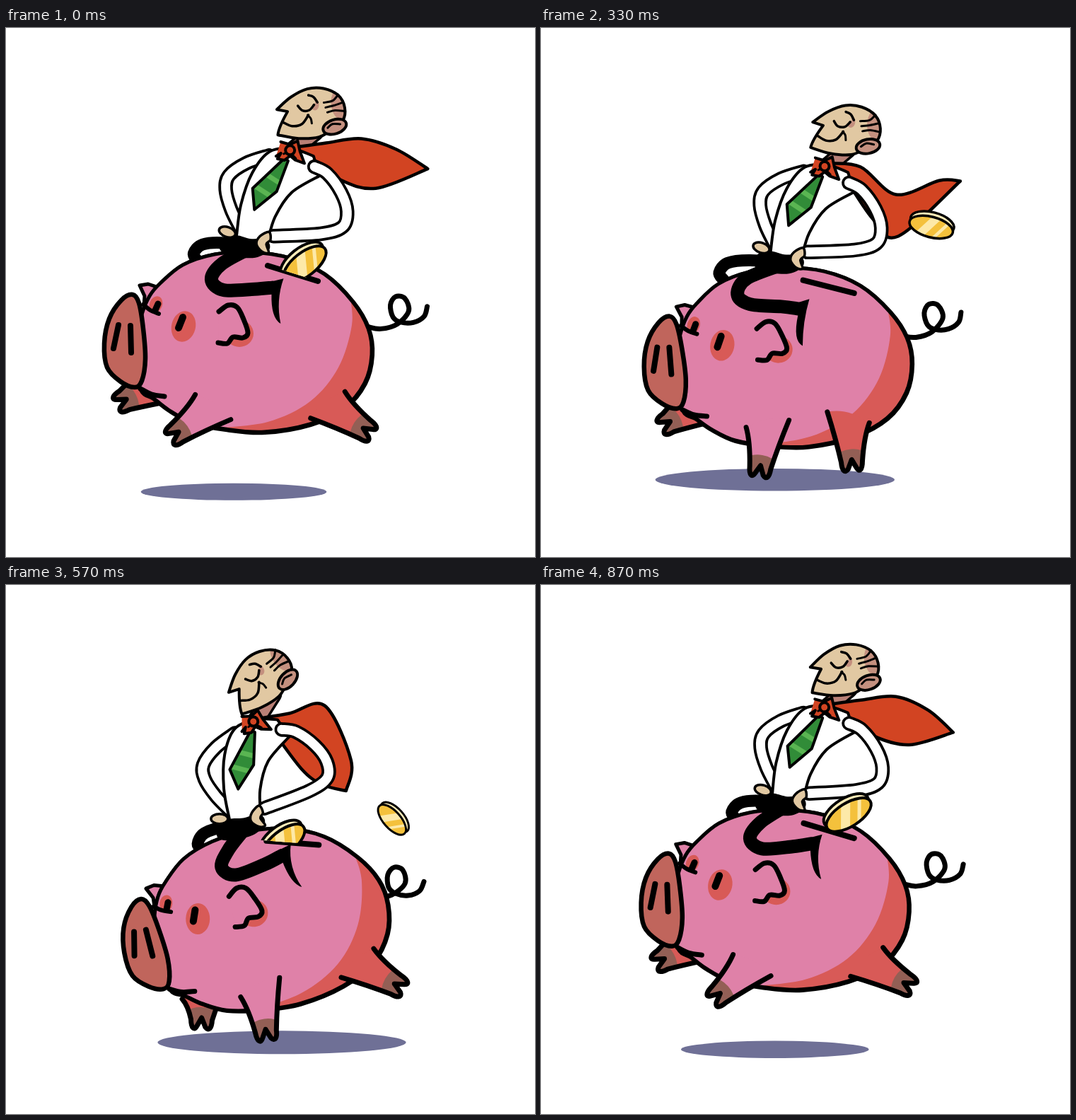
Animation, 748 px wide and 748 px high, one loop 0.9 s. Source, as an HTML page with a canvas:

```html
<!DOCTYPE html>
<html>
<head>
<meta charset="utf-8">
<style>
html, body { margin: 0; width: 100%; height: 100%; overflow: hidden; background: #fff; }
canvas { display: block; width: 100vw; height: 100vh; }
</style>
</head>
<body>
<canvas id="stage" width="748" height="748"></canvas>
<script>
const ctx = document.getElementById('stage').getContext('2d');
const LOOP = 900, STEP = 30, DEG = Math.PI / 180;
const INK = '#000', WHITE = '#fff', PINK = '#df81a8', RED = '#d85a57', HOOF = '#935f55', SNOUT = '#c0655c',
  SKIN = '#e1c8a2', ROSE = '#c4907f', CAPE = '#d24422', GOLD = '#f4c13c', SHINE = '#fde9a8';

// The gallop: time, then x, y and tilt of the pig. Everything else follows it.
const gallop = [[0, 247, 416, 0], [210, 231, 423, 2.3], [330, 252, 443, -3], [450, 267, 471, -13.4],
  [570, 266, 467, -12.8], [750, 258, 436, -4]];

function pigPose(time) {
  const t = (time + LOOP) % LOOP, n = gallop.length;
  const key = j => {
    const [start, ...pose] = gallop[(j + n) % n];
    return { at: start + LOOP * Math.floor(j / n), pose };
  };
  let i = n - 1;
  while (gallop[i][0] > t) i--;
  const [a, b, c, d] = [i - 1, i, i + 1, i + 2].map(key);
  const span = c.at - b.at, u = (t - b.at) / span;
  return b.pose.map((from, k) => {
    const to = c.pose[k];
    const p = (to - a.pose[k]) / (c.at - a.at) * span, q = (d.pose[k] - from) / (d.at - b.at) * span;
    return from + u * (p + u * (3 * (to - from) - 2 * p - q + u * (2 * (from - to) + p + q)));
  });
}

// Two harmonics of the loop, phases in degrees
function wave(t, mean, amp, phase, amp2 = 0, phase2 = 0) {
  const a = 360 * t / LOOP;
  return mean + amp * Math.cos((a - phase) * DEG) + amp2 * Math.cos((2 * a - phase2) * DEG);
}

// Smooth curve through a flat list of points
function curve(path, pts, closed) {
  const n = pts.length / 2;
  const at = j => {
    j = closed ? (j + n) % n : Math.max(0, Math.min(n - 1, j));
    return [pts[2 * j], pts[2 * j + 1]];
  };
  path.lineTo(...at(0));
  for (let i = 0; i < (closed ? n : n - 1); i++) {
    const a = at(i - 1), b = at(i), c = at(i + 1), d = at(i + 2);
    path.bezierCurveTo(b[0] + (c[0] - a[0]) / 6, b[1] + (c[1] - a[1]) / 6,
      c[0] - (d[0] - b[0]) / 6, c[1] - (d[1] - b[1]) / 6, c[0], c[1]);
  }
  if (closed) path.closePath();
  return path;
}
const smooth = (...pts) => curve(new Path2D(), pts);
const blob = (...pts) => curve(new Path2D(), pts, true);
function poly(...pts) {
  const path = new Path2D();
  for (let i = 0; i < pts.length; i += 2) path.lineTo(pts[i], pts[i + 1]);
  return path;
}
function oval(x, y, rx, ry, deg = 0) {
  const path = new Path2D();
  path.ellipse(x, y, rx, ry, deg * DEG, 0, 7);
  return path;
}
function fill(path, color) { ctx.fillStyle = color; ctx.fill(path); }
function line(path, width = 4, color = INK) {
  ctx.strokeStyle = color;
  ctx.lineWidth = width;
  ctx.stroke(path);
}
function shape(path, color, width = 4) { fill(path, color); line(path, width); }
function inside(path, draw) { ctx.save(); ctx.clip(path); draw(); ctx.restore(); }
function place([x, y, deg], ax, ay, draw, sx = 1, sy = 1) {
  ctx.save();
  ctx.translate(x, y);
  ctx.rotate(deg * DEG);
  ctx.scale(sx, sy);
  ctx.translate(-ax, -ay);
  draw();
  ctx.restore();
}
function locate([x, y, deg], dx, dy) {
  const c = Math.cos(deg * DEG), s = Math.sin(deg * DEG);
  return [x + dx * c - dy * s, y + dx * s + dy * c];
}

// A leg lies along x from hip to hoof; side flips it front to back
function pigLeg(hip, angle, length, side, color) {
  place([...hip, angle], 0, 0, () => {
    const edge = new Path2D();
    edge.moveTo(10, -29);
    edge.quadraticCurveTo(length * .4, -20, length - 10, -15);
    edge.bezierCurveTo(length + 3, -14, length + 6, -9, length - 1, -6);
    edge.lineTo(length - 13, 0);
    edge.lineTo(length, 6);
    edge.bezierCurveTo(length + 6, 11, length + 1, 15, length - 10, 15);
    edge.quadraticCurveTo(length * .4, 20, -10, 29);
    const skin = new Path2D(edge);
    skin.quadraticCurveTo(-14, 0, 10, -29);
    fill(skin, color);
    inside(skin, () => fill(oval(length + 6, 0, 34, 38), HOOF));
    line(edge, 7);
  }, 1, side);
}

const bodyPath = blob(190, 510, 178, 460, 192, 405, 203, 379, 218, 361, 250, 335, 295, 320, 345, 317, 400, 325,
  450, 348, 490, 387, 512, 425, 517, 462, 507, 502, 478, 537, 430, 560, 365, 571, 310, 567, 262, 557, 230, 540, 208, 523);
const shadePath = smooth(486, 376, 489, 420, 470, 480, 430, 528, 370, 557, 295, 566);
shadePath.lineTo(300, 610);
shadePath.lineTo(560, 610);
shadePath.lineTo(560, 376);
const snoutPath = blob(179, 377, 163, 385, 146, 411, 139, 446, 143, 480, 162, 500, 182, 508, 192, 499, 197, 468, 194, 425, 188, 389);
const earPath = smooth(301, 401, 314, 392, 327, 395, 336, 412, 342, 431, 335, 438, 321, 437, 313, 446, 300, 445);

function pigTail() {
  line(smooth(470, 410, 510, 421, 530, 424, 553, 417, 569, 398, 563, 380, 550, 378, 543, 390, 547, 407,
    558, 414, 576, 414, 591, 405, 595, 391), 7);
}
function farEar() {
  shape(poly(195, 393, 196, 379, 189, 364, 201, 362, 216, 367, 206, 385), PINK, 5);
}
function pigBody() {
  place([.8, .8, 0], 0, 0, () => line(bodyPath, 6.5));
  fill(bodyPath, PINK);
  inside(bodyPath, () => {
    fill(shadePath, RED);
    fill(oval(212, 391, 9, 12, 20), RED);
  });
  line(bodyPath, 5);
}
function pigFace() {
  line(smooth(190, 510, 206, 518, 224, 521), 7);
  line(poly(215, 390, 211, 399), 9);
  line(smooth(194, 391, 204, 399, 216, 404), 6);
  fill(oval(251, 422, 17, 22, 14), RED);
  line(poly(250, 409, 244, 424), 10);
  fill(oval(330, 432, 20, 19), RED);
  fill(earPath, PINK);
  line(earPath, 7);
  shape(snoutPath, SNOUT, 6.5);
  line(poly(159, 420, 152, 453), 8);
  line(poly(176, 421, 177, 459), 8);
  line(poly(370, 336, 441, 358), 8);
}

// The rider's legs slide to and fro over the pig's back
function farRiderLeg(slide) {
  const x = 264 + 15 * slide, y = 319;
  line(smooth(346, 311, x + 45, y - 15, x + 13, y - 13, x, y, x + 6, y + 11), 17);
}
function nearRiderLeg(slide) {
  const kx = 278 + 16 * slide, ky = 355 + 5 * slide, hx = 389 + 17 * slide, hy = 356 - 10 * slide;
  const tx = 386 + 27 * slide, ty = 419 - 12 * slide;
  line(smooth(346, 311, kx + 26, ky - 22, kx + 11, ky, kx + 28, ky + 15, kx + 72, (hy + ky) / 2 + 14, hx - 14, hy + 12), 19);
  const foot = new Path2D();
  foot.moveTo(hx + 2, hy - 1);
  foot.quadraticCurveTo(hx - 9, hy + 30, tx, ty);
  foot.quadraticCurveTo(tx - 14, ty - 8, hx - 15, hy + 20);
  foot.lineTo(hx - 22, hy + 5);
  fill(foot, INK);
}

function sleeve(path) { line(path, 20.5); line(path, 13, WHITE); }
function torso() {
  sleeve(smooth(374, 181, 342, 191, 317, 208, 312, 228, 319, 256, 331, 282));
  const shirt = smooth(326, 294, 333, 250, 350, 205, 376, 175, 410, 173, 437, 183);
  curve(shirt, [445, 211, 405, 234, 381, 268, 370, 302]);
  shape(shirt, WHITE);
  const tie = poly(397, 185, 401, 189, 384, 232, 352, 257, 350, 227, 395, 186);
  fill(tie, '#318c38');
  inside(tie, () => {
    for (const y of [202, 229]) line(poly(345, y - 11, 400, y + 26), 7, '#5ab552');
  });
  line(tie);
}
function armsAndKnot() {
  fill(blob(326, 293, 345, 298, 368, 300, 372, 314, 352, 325, 318, 322, 302, 312, 308, 297), INK);
  sleeve(smooth(438, 198, 456, 208, 475, 235, 483, 262, 476, 284, 445, 293, 378, 295));
  shape(oval(313, 288, 12, 7, 20), SKIN, 3.5);
  shape(blob(372, 289, 359, 295, 354, 306, 362, 317, 371, 318, 368, 306, 374, 300), SKIN, 3.5);
  shape(poly(391, 162, 404, 166, 415, 161, 418, 176, 424, 193, 411, 188, 404, 182, 396, 188, 386, 186, 391, 178, 384, 182), CAPE);
  line(poly(395, 179, 403, 176, 412, 186), 3);
  shape(oval(404, 174, 6.5, 6.5), CAPE);
}

// Cloth hung from the knot; each edge point sways on its own phase
function cape(t) {
  const topY = wave(t, 0, 27, 118, 14, 255);
  const foldX = wave(t, 150, 16, 90), foldY = wave(t, 22, 33, 225);
  const tipX = wave(t, 171, 48, 75, 12, 20), tipY = wave(t, 50, 48, 255, 12, 160);
  const hemX = wave(t, 109, 13, 20), hemY = wave(t, 78, 25, 165);
  const cloth = smooth(6, -4, 51, -7 + topY * .2, 101, topY, foldX, foldY, tipX, tipY);
  curve(cloth, [tipX, tipY, hemX, hemY, 68, hemY * .75, 24, 8]);
  cloth.closePath();
  shape(cloth, CAPE, 4.5);
}

const skullPath = smooth(387, 114, 408, 98, 432, 88, 455, 89, 475, 100, 483, 118, 479, 136, 462, 148, 444, 157, 415, 157, 386, 150);
skullPath.quadraticCurveTo(388, 139, 402, 118);
skullPath.closePath();
function riderHead() {
  fill(skullPath, SKIN);
  inside(skullPath, () => {
    fill(oval(480, 112, 16, 24), ROSE);
    fill(oval(441, 111, 6, 8), ROSE);
    fill(oval(434, 107, 8, 8), SKIN);
  });
  line(skullPath);
  shape(oval(467, 144, 17, 10, -14), ROSE);
  line(smooth(457, 145, 464, 140, 475, 141), 3);
  line(smooth(433, 97, 440, 100, 445, 108), 3.5);
  line(smooth(417, 111, 423, 118, 433, 118, 440, 111), 3.5);
  line(smooth(395, 133, 407, 139, 421, 137, 431, 125), 3.5);
  line(smooth(430, 125, 434, 130, 435, 137), 3);
  for (let i = 0; i < 3; i++) line(smooth(454 + 2 * i, 109 + 7 * i, 467 + i, 107 + 7 * i, 475 + 4 * i, 99 + 12 * i), 3);
}

// Each coin tumbles along an arc into the slot
const coins = [{ start: 150, life: 510, x: 625, y: 318, rise: 72 }, { start: 510, life: 600, x: 552, y: 335, rise: 52 }];
function drawCoin(coin, age) {
  const u = age / coin.life, e = u * u * (3 - 2 * u);
  const x = coin.x + (370 - coin.x) * e;
  const y = coin.y + (390 - coin.y) * e - coin.rise * 4 * e * (1 - e);
  const size = Math.min(1, .72 + .55 * e);
  place([x, y, Math.max(-38, 52 - 130 * e)], 0, 0, () => {
    const face = oval(0, 2, 36, 16.5);
    shape(oval(0, -5, 36, 17), '#fcecb8');
    fill(face, GOLD);
    inside(face, () => {
      line(poly(-20, 25, 10, -22), 13, SHINE);
      line(poly(3, 25, 33, -22), 5, SHINE);
    });
    line(face);
  }, size, size);
}

function render(t) {
  const pig = pigPose(t), tilt = pig[2];
  const slide = wave(t, 0, 1, 275);
  const trunk = [...locate(pig, 92, -119), 1.4 * pigPose(t - 40)[2]];
  const head = [...locate(trunk, 88, -169), 2.3 * pigPose(t - 80)[2]];
  const knot = locate(trunk, 65, -123);
  const onPig = draw => place(pig, 247, 416, draw);
  const onTrunk = draw => place(trunk, 339, 297, draw);
  const hind = wave(t, 50, 33, 108, 8, 216);
  const fore = wave(t, 116, 43, 25, 12, 155);
  const farFore = wave(t, 137, 36, 45, 14, 220);

  ctx.fillStyle = WHITE;
  ctx.fillRect(0, 0, 748, 748);
  ctx.lineCap = ctx.lineJoin = 'round';
  fill(oval(wave(t, 345, 46, 240), wave(t, 648, 9.5, 325), wave(t, 156, 25, 190), wave(t, 14.5, 2.5, 190)), '#6f7096');

  pigLeg(locate(pig, 42 - .58 * farFore, 138 - .3 * farFore), farFore, 48, -1, RED);
  onPig(() => {
    place([466 + 1.6 * tilt, 416, -1.6 * pigPose(t - 40)[2]], 466, 416, pigTail);
    farEar();
    farRiderLeg(slide);
    pigBody();
  });
  pigLeg(locate(pig, 228 - .6 * hind, 117), hind, 73, 1, RED);
  pigLeg(locate(pig, 99 - .37 * fore, 120), fore, 73, -1, PINK);
  onPig(pigFace);

  const neck = poly(...locate(head, 11, 22), ...locate(trunk, 67, -121));
  line(neck, 26);
  line(neck, 19, '#b98076');
  place([...knot, 0], 0, 0, () => cape(t));
  onTrunk(torso);
  onPig(() => nearRiderLeg(slide));
  onTrunk(armsAndKnot);
  place(head, 427, 128, riderHead);

  // Coins vanish below the line of the slot
  const left = locate(pig, -247, -195), right = locate(pig, 753, 115);
  inside(poly(...left, ...right, 1500, -600, -600, -600), () => {
    for (const coin of coins) {
      const age = (t - coin.start + LOOP) % LOOP;
      if (age < coin.life) drawCoin(coin, age);
    }
  });
}

function tick() {
  render(Math.floor(performance.now() % LOOP / STEP) * STEP);
  requestAnimationFrame(tick);
}
tick();
</script>
</body>
</html>
```
